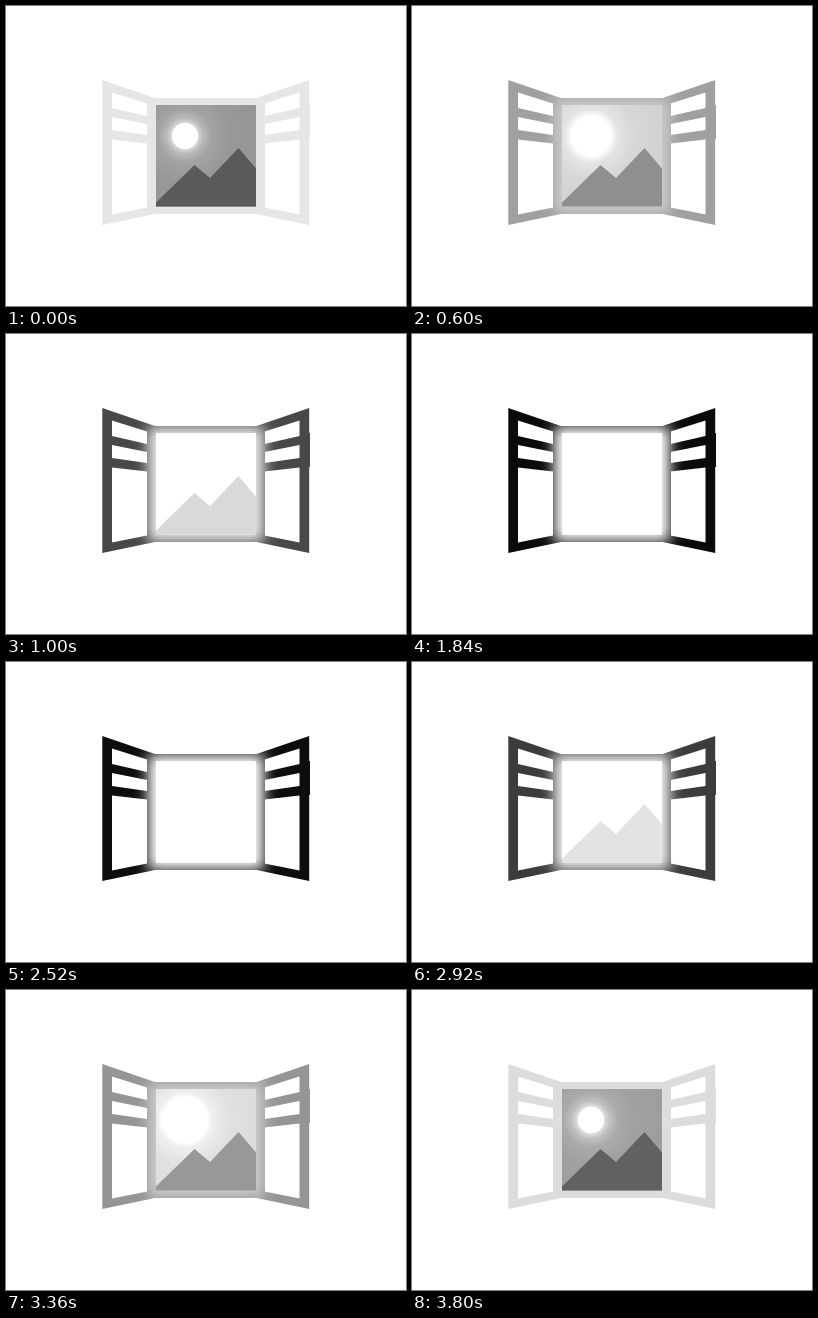
An HTML page that plays this animation: 400 by 300 pixels, repeating every 4.04 s.

```html
<!DOCTYPE html>
<html lang="en">
<head>
<meta charset="utf-8">
<title>Window exposure</title>
<style>
  html, body { margin: 0; width: 100%; height: 100%; overflow: hidden; background: #fff; }
  svg { display: block; width: 100vw; height: 100vh; }
  .wood { fill: var(--wood); fill-rule: evenodd; }
  .glow { opacity: var(--glow); }
  .sky { filter: brightness(var(--sky)); }
  .hills { fill: var(--hills); }
</style>
</head>
<body>
<svg viewBox="0 0 400 300">
  <defs>
    <path id="shutter" d="M96.3 74 149 92V208L96.3 219Z
      M106 86.5V102L141 110V97.5Z
      M106 111V124L141 129V118Z
      M106 133.5V208.5L141 201.5V137.5Z"/>
    <radialGradient id="air" gradientUnits="userSpaceOnUse" cx="179" cy="130" r="100">
      <stop offset=".2" stop-color="#9b9b9b"/>
      <stop offset="1" stop-color="#939393"/>
    </radialGradient>
    <radialGradient id="halo">
      <stop offset=".28" stop-color="#fff" stop-opacity=".62"/>
      <stop offset=".42" stop-color="#fff" stop-opacity=".28"/>
      <stop offset=".6" stop-color="#fff" stop-opacity=".08"/>
      <stop offset="1" stop-color="#fff" stop-opacity="0"/>
    </radialGradient>
    <filter id="soft" filterUnits="userSpaceOnUse" x="90" y="40" width="220" height="220">
      <feGaussianBlur stdDeviation="7"/>
    </filter>
    <clipPath id="pane"><rect x="150" y="99" width="100" height="101.5"/></clipPath>
  </defs>

  <g class="wood">
    <use href="#shutter"/>
    <use href="#shutter" transform="translate(399.5) scale(-1 1)"/>
    <rect x="303" y="99" width="1" height="34"/>
    <rect x="141" y="92" width="118" height="116"/>
  </g>
  <rect class="glow" x="142" y="92.5" width="116" height="115" fill="#fff" filter="url(#soft)"/>

  <g clip-path="url(#pane)">
    <g class="sky">
      <rect x="150" y="99" width="100" height="102" fill="url(#air)"/>
      <circle cx="179" cy="130" r="45" fill="url(#halo)"/>
      <circle cx="179" cy="130" r="13.2" fill="#fff"/>
    </g>
    <path class="hills" d="M150 196.5 188.5 159 204 172 232.5 142 250 162.5V201H150Z"/>
  </g>
</svg>
<script>
  const LOOP = 4040;
  // The picture is held between these moments.
  const TICKS = [0, 240, 320, 400, 480, 600, 680, 760, 840, 920, 1000, 1080, 1200, 1280,
    1400, 1560, 1840, 2440, 2480, 2520, 2680, 2760, 2840, 2920, 2960, 3080, 3200,
    3280, 3360, 3440, 3520, 3640, 3720, 3800];

  const style = document.documentElement.style;
  const grey = v => {
    const c = Math.round(Math.max(0, Math.min(255, v)));
    return `rgb(${c},${c},${c})`;
  };
  const ease = (t, from, to) => {
    const x = Math.max(0, Math.min(1, (t - from) / (to - from)));
    return (1 - Math.cos(Math.PI * x)) / 2;
  };

  function draw(t) {
    const light = ease(t, 50, 1550) - ease(t, 2400, 4000);
    style.setProperty('--wood', grey(230 - 220 * light ** 0.94));
    style.setProperty('--glow', Math.sin(light * Math.PI / 2));
    style.setProperty('--sky', 1 + 1.37 * light);
    style.setProperty('--hills', grey(90 * (1 + 2 * light)));
  }

  const start = performance.now();
  let shown = -1;
  function frame() {
    const t = (performance.now() - start) % LOOP;
    const tick = TICKS.findLast(k => k <= t);
    if (tick !== shown) draw(shown = tick);
    requestAnimationFrame(frame);
  }
  frame();
</script>
</body>
</html>
```
